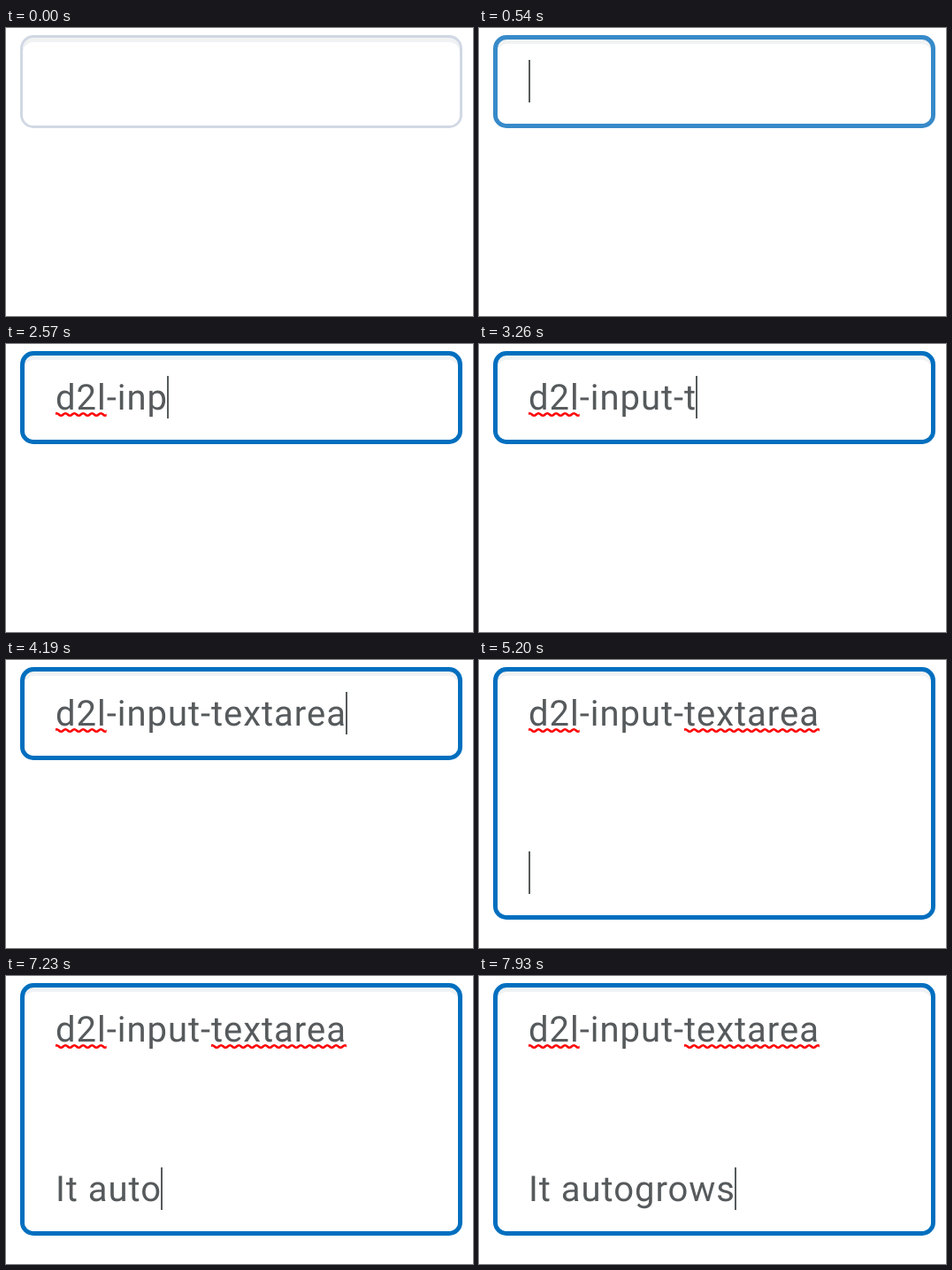
Animation of 528x325 px, one loop 8000 ms. Source, as an HTML page with a canvas:

```html
<!DOCTYPE html>
<html lang="en">
<head>
<meta charset="utf-8">
<title>Autogrowing textarea</title>
<style>
  html, body { margin: 0; width: 528px; height: 325px; overflow: hidden; background: #fff; }
  canvas { display: block; }
</style>
</head>
<body>
<canvas id="stage" width="528" height="325"></canvas>
<script>
const ctx = document.getElementById('stage').getContext('2d');

const LOOP = 8000;
const FOCUS = 320, FADE = 500;
const LEFT = 56, TOP = 36, LINE = 60, CARET = 48, BASE = 38;
const INK = '#565a5c';
const IDLE = [209, 216, 228], ACTIVE = [0, 111, 191];
const HIDDEN = [[0, FOCUS], [2090, 2218], [5660, 6210]];

// [text, time of first key, time of last key]
const RUNS = [
  ['d2l', 860, 1330],
  ['-', 1560, 1560],
  ['input-', 2218, 2860],
  ['t', 3260, 3260],
  ['extarea', 3330, 4190],
  ['\n\n', 4650, 4880],
  ['\n', 5200, 5200],
  ['It auto', 6356, 7230],
  ['grows', 7380, 7930]
];

const KEYS = RUNS.flatMap(([text, from, to]) =>
  [...text].map((char, i) => ({
    char,
    at: from + (to - from) * i / Math.max(1, text.length - 1)
  })));

// CSS "ease": cubic-bezier(.25, .1, .25, 1)
function ease(x) {
  if (x <= 0 || x >= 1) return Math.min(1, Math.max(0, x));
  const curve = (a, b, u) => 3 * a * u * (1 - u) ** 2 + 3 * b * u * u * (1 - u) + u ** 3;
  let lo = 0, hi = 1;
  for (let i = 0; i < 24; i++) {
    const mid = (lo + hi) / 2;
    if (curve(.25, .25, mid) < x) lo = mid; else hi = mid;
  }
  return curve(.1, 1, lo);
}

function fillRound(x, y, w, h, r, color) {
  ctx.fillStyle = color;
  ctx.beginPath();
  ctx.roundRect(x, y, w, h, r);
  ctx.fill();
}

function drawBox(t, lines) {
  const height = 45 + LINE * lines;
  const border = t < FOCUS ? 3 : 5;
  const p = ease((t - FOCUS) / FADE);
  const color = IDLE.map((c, i) => Math.round(c + (ACTIVE[i] - c) * p));
  const x = 16 + border, y = 8 + border;
  const w = 500 - 2 * border, h = height - 2 * border, r = 15 - border;

  fillRound(16, 8, 500, height, 15, `rgb(${color})`);
  fillRound(x, y, w, h, r, '#f0f2f3');
  // The white face sits lower to leave the inset shadow on top.
  ctx.save();
  ctx.clip();
  fillRound(x, y + 5, w, h, r, '#fff');
  ctx.restore();
}

function drawSquiggle(x, width) {
  const y = TOP + 41;
  ctx.save();
  ctx.beginPath();
  ctx.rect(x, y, width, 5);
  ctx.clip();
  ctx.strokeStyle = '#f00';
  ctx.lineWidth = 2.5;
  ctx.beginPath();
  let px = x - 3.75, low = true;
  ctx.moveTo(px, y + 3.75);
  for (; px < x + width; px += 5, low = !low) {
    const a = y + (low ? 3.75 : 1.25), b = y + (low ? 1.25 : 3.75);
    ctx.bezierCurveTo(px + 2.5, a, px + 2.5, b, px + 5, b);
  }
  ctx.stroke();
  ctx.restore();
}

function draw(t) {
  const typed = KEYS.filter(k => k.at <= t).map(k => k.char).join('');
  const lines = typed.split('\n');
  const last = lines.length - 1;

  ctx.fillStyle = '#fff';
  ctx.fillRect(0, 0, 528, 325);
  drawBox(t, lines.length);

  ctx.font = '400 40px Roboto, sans-serif';
  ctx.letterSpacing = '0.97px';
  ctx.textRendering = 'geometricPrecision';
  ctx.textBaseline = 'alphabetic';
  const width = s => ctx.measureText(s).width;

  if (typed.includes('-')) drawSquiggle(LEFT, width('d2l'));
  if (last > 0) drawSquiggle(LEFT + width('d2l-input-'), width('textarea'));

  ctx.fillStyle = INK;
  lines.forEach((line, i) => ctx.fillText(line, LEFT, TOP + BASE + LINE * i));

  if (!HIDDEN.some(([from, to]) => t >= from && t < to)) {
    const x = Math.max(LEFT, Math.round(LEFT - 1.2 + width(lines[last])));
    ctx.fillRect(x, TOP + LINE * last, 2, CARET);
  }
}

const start = performance.now();
function tick() {
  draw((performance.now() - start) % LOOP);
  requestAnimationFrame(tick);
}
tick();
</script>
</body>
</html>
```
